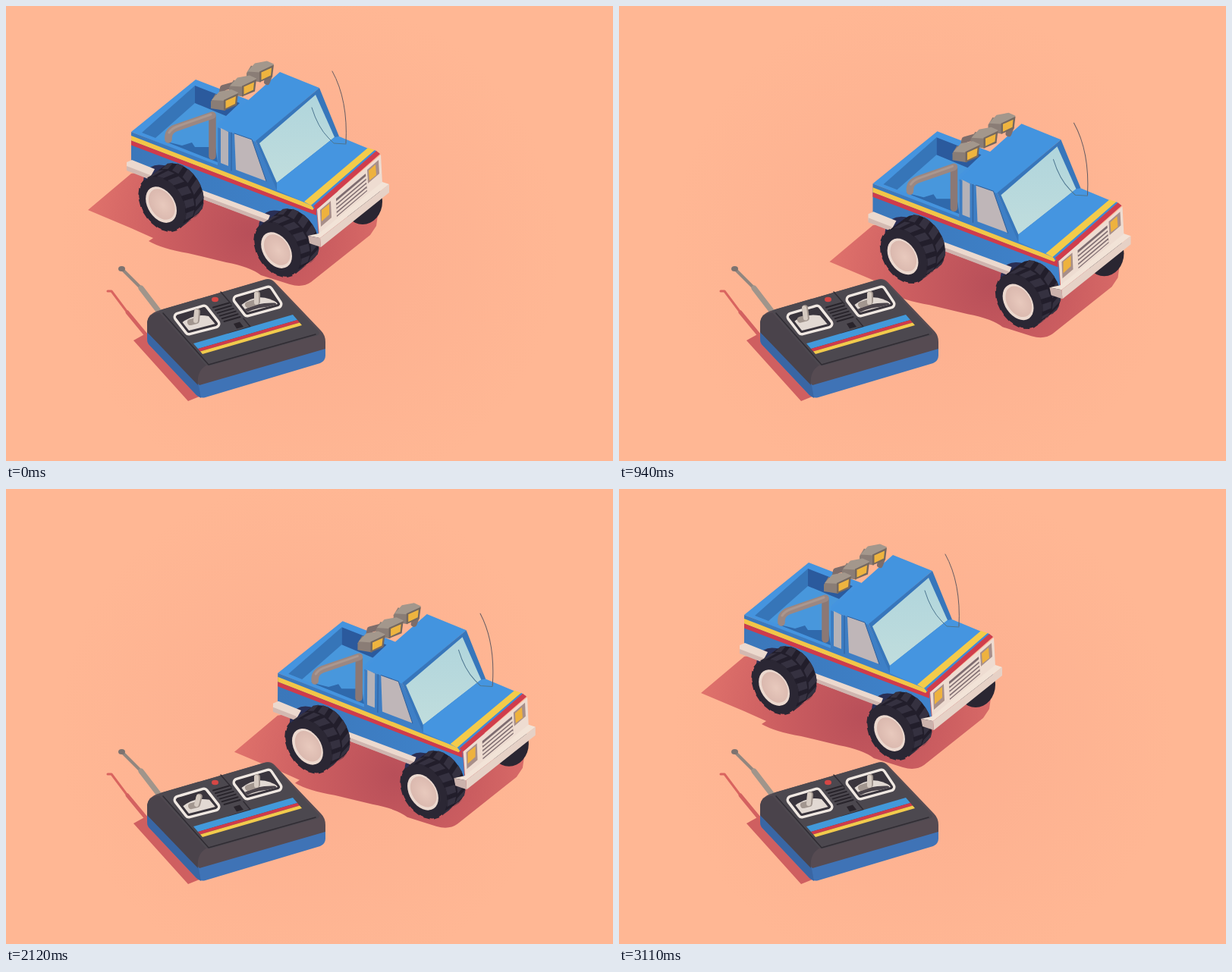
An HTML page for the animation above (3.61 s loop, 800 by 600 pixels).

```html
<!DOCTYPE html>
<html lang="en">
<head>
<meta charset="utf-8">
<title>Toy truck</title>
<style>
  html, body { margin: 0; width: 100%; height: 100%; overflow: hidden; background: #ffb794; }
  svg { display: block; width: 100%; height: 100%; }
  .line { fill: none; stroke-linecap: round; stroke-linejoin: round; }
</style>
</head>
<body>
<svg viewBox="0 0 800 600">
  <defs>
    <radialGradient id="floor" gradientUnits="userSpaceOnUse" cx="400" cy="320" r="330">
      <stop offset="0" stop-color="#fcae8f"/>
      <stop offset="1" stop-color="#ffb794"/>
    </radialGradient>
    <radialGradient id="shade" gradientUnits="userSpaceOnUse" cx="320" cy="300" r="210">
      <stop offset="0" stop-color="#b84f59"/>
      <stop offset=".5" stop-color="#cb5d60"/>
      <stop offset="1" stop-color="#df716b"/>
    </radialGradient>
    <linearGradient id="side" x1="0" y1="0" x2="1" y2="0">
      <stop offset="0" stop-color="#3b77ba"/>
      <stop offset="1" stop-color="#3f83cb"/>
    </linearGradient>
    <linearGradient id="glass" x1="0" y1="0" x2="0" y2="1">
      <stop offset="0" stop-color="#b0d5dc"/>
      <stop offset="1" stop-color="#c0dddd"/>
    </linearGradient>
    <radialGradient id="hub" cx=".55" cy=".5" r=".55">
      <stop offset="0" stop-color="#e8c9bd"/>
      <stop offset="1" stop-color="#dab8ae"/>
    </radialGradient>
    <clipPath id="clipL"><use href="#wellL"/></clipPath>
    <clipPath id="clipR"><use href="#wellR"/></clipPath>
    <path id="wellL" d="M227 410L261 400L276 419L241 428Z"/>
    <path id="wellR" d="M305 387L346 375L358 393L318 404Z"/>
    <g id="lamp">
      <path fill="#8a7d76" d="M270 126L276 116L289 122V138L270 135Z"/>
      <path fill="#a3978c" d="M271 124L281 113L297 110L306 114L304 119L289 125Z"/>
      <path fill="#75685f" d="M287 124L306 115L304 131L287 138Z"/>
      <path fill="#eeb43f" d="M289.500 125L303 119L302 129L289.500 135Z"/>
    </g>
  </defs>

  <rect width="800" height="600" fill="url(#floor)"/>

  <g id="truck">
    <path fill="url(#shade)" d="M108 269L165 221L300 200L492 262L488 290L480 302L402 364Q391 372 374 367L336 355Q322 344 290 338L240 326Q205 320 188 310L194 306L165 293Z"/>
    <ellipse cx="470" cy="258" rx="26" ry="30" fill="#2a2632"/>

    <g class="tilt">
      <!-- bed -->
      <path fill="#4594df" d="M165 166L250 97L320 124L279 163L279 211Z"/>
      <path fill="#4897dc" d="M179 167L249 105L308 128L279 155L279 206Z"/>
      <path fill="#3675b8" d="M179 167L249 105V128L197 174Z"/>
      <path fill="#2b5a9d" d="M249 105L308 128L290 145L249 128Z"/>
      <path fill="#2f69ac" d="M208 178L232 184L245 180L249 186L276 186L279 206Z"/>
      <!-- side panel -->
      <path fill="url(#side)" d="M165 166L279 210L279 160L329 178L358 243L409 264L412 303L165 207Z"/>
      <path fill="#f2c548" d="M165 171L358 245.500L402 262L408 271L165 177.500Z"/>
      <path fill="#cf3b4b" d="M165 177.500L404 269L409 264L409 276L165 183.500Z"/>
      <!-- wheel arches -->
      <circle r="33" fill="#2a2f55" transform="matrix(1 .39 0 1 214 245)"/>
      <circle r="33" fill="#2a2f55" transform="matrix(1 .39 0 1 366 305)"/>
      <!-- bumper and skirt -->
      <path fill="#ecd9ce" d="M159 206L166 203L196 215L190 226L159 214Z"/>
      <path fill="#d3b9b1" d="M159 211L190 223V229L159 217Z"/>
      <path fill="#ecd9ce" d="M240 236L348 276L344 286L244 249Z"/>
      <path fill="#cfb5af" d="M243 244L345 282L344 287L244 249Z"/>
      <!-- cab -->
      <path fill="#4394df" d="M279 160L361 87L413 108L329 179Z"/>
      <path fill="#3776bb" d="M329 178L413 108L439 172L357 243Z"/>
      <path fill="url(#glass)" d="M334 181L408 117L433 173L357 233Z"/>
      <path fill="#b5b2b7" d="M283 161L293 166V211L283 207Z"/>
      <path fill="#bfb6b8" d="M301 168L324 176L343 231L303 216Z"/>
      <path class="line" stroke="#2f5f9a" d="M297 167V217M301 168L324 176L343 231"/>
      <!-- hood -->
      <path fill="#4595e0" d="M357 243L357 233L433 173L439 172L492 194L409 266Z"/>
      <path fill="#f4cb4a" d="M393 258L477 187L486 190L402 263Z"/>
      <path fill="#3f8cd6" d="M402 263L486 190L489 192L405 264Z"/>
      <path fill="#d03d4c" d="M405 264L488 191L493 195L410 268Z"/>
      <!-- roll bar -->
      <path class="line" stroke="#7d6d6b" stroke-width="8" d="M282 128L286 108L300 104M344 100L347 92"/>
      <path class="line" stroke="#8b7875" stroke-width="9.500" d="M272 198V146"/>
      <path class="line" stroke="#9b8782" stroke-width="9.500" d="M214 176Q213 165 223 161L272 144"/>
      <path class="line" stroke="#aa978f" stroke-width="3" d="M215 167Q218 162 225 159L270 143"/>
      <use href="#lamp" x="47" y="-37.500"/>
      <use href="#lamp" x="24" y="-18.500"/>
      <use href="#lamp"/>
      <!-- aerial -->
      <path class="line" stroke="#4d7690" d="M403 134Q411 160 425 174L432 181L448 182"/>
      <path id="aerial" class="line" stroke="#655c62" d="M430 86Q451 124 448 181"/>
    </g>

    <g id="wheels"></g>

    <g class="tilt">
      <!-- front end -->
      <path fill="#eedcd1" d="M410 268L494 196L496 234L413 304Z"/>
      <path fill="#a88f8a" d="M414 269L428 257L429 279L415 291Z"/>
      <path fill="#eeb23e" d="M416 269L426 261V275L416 284Z"/>
      <path fill="#a88f8a" d="M476 216L491 203L492 221L477 234Z"/>
      <path fill="#eeb23e" d="M478 217L487 209L488 223L479 230Z"/>
      <path fill="#7e6c70" d="M435 254L474 221L476 244L436 278Z"/>
      <path id="slats" class="line" stroke="#ebd9ce" stroke-width="2.600"/>
      <path fill="#f2e3d7" d="M398 303L414 306L505 235L496 232L412 300Z"/>
      <path fill="#e6d1c6" d="M414 306L505 235V246L415 318Z"/>
      <path fill="#cbb2ac" d="M398 303L414 306L415 318L400 313Z"/>
    </g>
  </g>

  <!-- handset -->
  <g>
    <path fill="#cf5f60" d="M168 441L186 431L262 512L240 521Z"/>
    <path class="line" stroke="#d9645f" stroke-width="3" d="M134 376H139L160 404"/>
    <path class="line" stroke="#d36160" stroke-width="5" d="M160 404L188 438"/>
    <path class="line" stroke="#91867f" stroke-width="4" d="M154 348L181 375"/>
    <path class="line" stroke="#a0958b" stroke-width="7" d="M178 372L201 402"/>
    <ellipse cx="152.500" cy="346.500" rx="4.500" ry="3.500" fill="#7d7370"/>

    <path fill="#3f73b6" d="M186 425L253 495L421 448V461Q421 468 414 471L263 516Q256 518 251 513L188 446Q186 443 186 438Z"/>
    <path fill="#3966a4" d="M186 425L253 495L257 517L251 513L188 446Q186 443 186 438Z"/>
    <path fill="#564b52" d="M186 430V417Q187 406 200 402L340 361Q348 358 354 364L415 428Q421 434 421 443V452L255 500Z"/>
    <path fill="#4a434b" d="M186 430V417Q188 406 202 404L264 474Q251 481 253 500Z"/>
    <path fill="#4c484f" d="M203 404Q200 402 206 400L338 362Q346 359 352 365L411 428Q416 433 408 435L270 474Q264 475 261 471Z"/>
    <path class="line" stroke="#302c33" stroke-width="1.500" d="M207 405L267 473L408 433M283 377L297 393M313 412L322 423L293 432"/>

    <path fill="#4299da" d="M247 445L378 407L384 414L253 452Z"/>
    <path fill="#cf3b4b" d="M253 452L384 414L387 417.500L256 455.500Z"/>
    <path fill="#f2cb4c" d="M256 455.500L387 417.500L390 421L259 459Z"/>

    <path id="vents" class="line" stroke="#28242b" stroke-width="2"/>
    <ellipse cx="275.500" cy="387" rx="4.500" ry="3.300" fill="#d64745"/>
    <path fill="#29242b" d="M300 419L308 416.500L313 423L304 425.500Z"/>

    <g stroke-linejoin="round" fill="#f0e8e2" stroke="#f0e8e2" stroke-width="13">
      <use href="#wellL"/><use href="#wellR"/>
    </g>
    <g stroke-linejoin="round" fill="#3a353d" stroke="#3a353d" stroke-width="6">
      <use href="#wellL"/><use href="#wellR"/>
    </g>
    <g clip-path="url(#clipL)">
      <path id="plate" fill="#e2d9d3" d="M230 419Q246 405 267 409L280 424L240 434Z"/>
    </g>
    <path id="stickShade" class="line" stroke="#a2968f" stroke-width="8"/>
    <path id="stick" class="line" stroke="#d5cac1" stroke-width="6"/>
    <g clip-path="url(#clipR)">
      <path fill="#e2d9d3" d="M309 395Q335 374 361 394L317 410Z"/>
      <path class="line" stroke="#4b444b" stroke-width="5" d="M316 402Q333 393 354 394"/>
    </g>
    <path class="line" stroke="#a2968f" stroke-width="8" d="M319 394L331 390V380"/>
    <path class="line" stroke="#d5cac1" stroke-width="6" d="M330 391V380"/>
  </g>
</svg>

<script>
const LOOP = 3610;
const $ = id => document.getElementById(id);

// Smooth keyframe track without overshoot: [time, value] pairs
function track(keys) {
  const d = keys.slice(1).map(([t, v], i) => (v - keys[i][1]) / (t - keys[i][0]));
  const m = keys.map((_, i) => d[i - 1] * d[i] > 0 ? 2 * d[i - 1] * d[i] / (d[i - 1] + d[i]) : 0);
  return t => {
    const j = keys.findIndex(k => k[0] > t);
    if (j < 1) return keys[j < 0 ? keys.length - 1 : 0][1];
    const i = j - 1, [t0, a] = keys[i], [t1, b] = keys[j];
    const h = t1 - t0, u = (t - t0) / h, w = 1 - u;
    return a * w * w * (1 + 2 * u) + b * u * u * (3 - 2 * u) + h * u * w * (m[i] * w - m[j] * u);
  };
}

const drive = track([[400, 0], [670, 69], [910, 163], [1090, 190], [1250, 195.5],
  [2090, 195.5], [2330, 107.5], [2600, -16.3], [2950, 0]]);
const pitch = track([[400, 0], [510, -1.8], [670, 0], [930, 0], [1270, 2.1], [1480, -0.7], [1690, 0],
  [2090, 0], [2190, 1.6], [2330, 0], [2430, 0], [2600, -1.9], [2820, 0.8], [3110, 0]]);
const sway = track([[400, 0], [520, -4], [680, 0], [930, 0], [1270, 5], [1450, -3], [1690, 0],
  [2090, 0], [2200, 4], [2330, 0], [2440, 0], [2600, -2.5], [2830, 3], [3110, 0]]);
const lever = track([[400, 0], [490, 1], [900, 1], [1010, 0],
  [2090, 0], [2180, -1], [2610, -1], [2720, 0]]);

const lines = (n, f) => Array.from({ length: n }, (_, i) => f(i)).join('');
$('slats').setAttribute('d', lines(4, i => `M436 ${258.5 + i * 5.4}L475 ${225.5 + i * 5.4}`));
$('vents').setAttribute('d', lines(6, i => `M${273 + i * 2.9} ${397.5 + i * 3.7}l21 -6`));

// Tyre: a short cylinder whose round faces are sheared along the truck's side
const FACE = [206, 261], DEPTH = [24, -18], RX = 30.5, RY = 33.5, SHEAR = 0.39;
const rimPoint = (a, depth, r = 1) => {
  const x = RX * r * Math.cos(a), y = SHEAR * x + RY * r * Math.sin(a);
  return `${(FACE[0] + DEPTH[0] * depth + x).toFixed(1)} ${(FACE[1] + DEPTH[1] * depth + y).toFixed(1)}`;
};
const quad = (a, b, near, far, twist) =>
  `M${rimPoint(a, near, 1.03)}L${rimPoint(b, near, 1.03)}L${rimPoint(b + twist, far, 1.03)}L${rimPoint(a + twist, far, 1.03)}Z`;

const disc = (k, fill, scale = 1) => `<circle r="${RX * scale}" fill="${fill}" transform="matrix(1 ${SHEAR} 0 ${RY / RX}
  ${FACE[0] + DEPTH[0] * k} ${FACE[1] + DEPTH[1] * k})"/>`;
const wheel = (x, y) => `<g transform="translate(${x} ${y})">
  ${lines(9, i => disc(1 - i / 8, '#221e2b'))}<path class="lugs" fill="#353140"/>
  ${disc(0, '#2b2734')}<path class="teeth" fill="#2b2734"/>
  ${disc(-0.06, '#ecd9cf', 0.67)}${disc(-0.03, 'url(#hub)', 0.57)}</g>`;
$('wheels').innerHTML = wheel(0, 0) + wheel(152, 60);

const LUGS = 14, STEP = 2 * Math.PI / LUGS;
function tread(spin) {
  let lugs = '', teeth = '';
  for (let i = 0; i < LUGS; i++) {
    const a = spin + i * STEP, b = a + STEP * 0.6;
    teeth += `M${rimPoint(a, 0, 0.95)}L${rimPoint(a, 0, 1.04)}L${rimPoint(b, 0, 1.04)}L${rimPoint(b, 0, 0.95)}Z`;
    const facing = DEPTH[0] * Math.cos(a) / RX + (DEPTH[1] - SHEAR * DEPTH[0]) * Math.sin(a) / RY;
    if (facing < 0) continue;
    lugs += quad(a, b, 0, 0.46, 0.12) + quad(a + STEP / 2, b + STEP / 2, 0.54, 0.98, -0.12);
  }
  return [lugs, teeth];
}

const setAll = (selector, name, value) =>
  document.querySelectorAll(selector).forEach(el => el.setAttribute(name, value));

function draw(t) {
  const x = drive(t), s = lever(t), back = Math.max(-s, 0), up = Math.max(s, 0);
  $('truck').setAttribute('transform', `translate(${x} ${x * 0.403})`);
  setAll('.tilt', 'transform', `rotate(${pitch(t)} 330 220)`);
  $('aerial').setAttribute('transform', `rotate(${sway(t)} 448 181)`);

  const [lugs, teeth] = tread(x / 36);
  setAll('.lugs', 'd', lugs);
  setAll('.teeth', 'd', teeth);

  const tipX = 251 - 10 * up + 10 * back, tipY = 403 - 7 * up + 10 * back;
  const baseX = 250 - 6 * up + 4 * back, baseY = 415 - 5 * up + 4 * back;
  $('plate').setAttribute('transform', `translate(${back * 4 - up * 3} ${back * 3 - up})`);
  $('stickShade').setAttribute('d', `M${baseX - 7} ${baseY + 2}L${baseX + 1} ${baseY}L${tipX + 1} ${tipY}`);
  $('stick').setAttribute('d', `M${baseX} ${baseY}L${tipX} ${tipY}`);
}

const start = performance.now();
function frame() {
  draw((performance.now() - start) % LOOP);
  requestAnimationFrame(frame);
}
frame();
</script>
</body>
</html>
```
